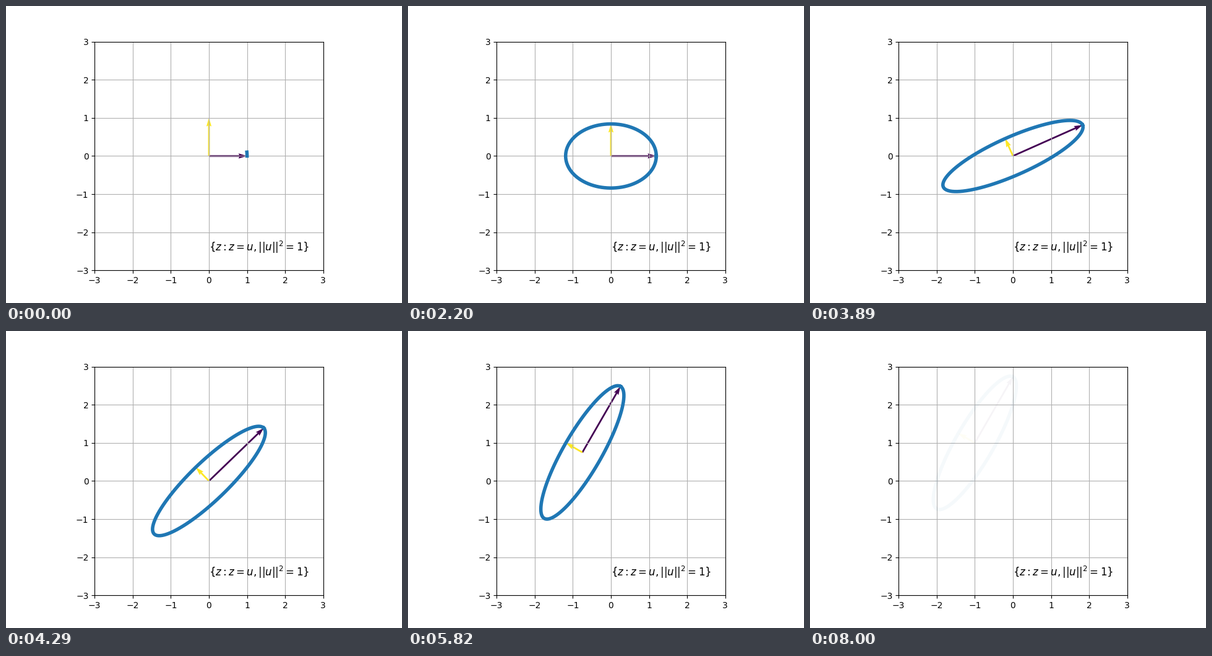
These frames come from a looping animation (640x480 px, 8.04 s). A matplotlib script:

```python
import numpy as np
import matplotlib.pyplot as plt
from matplotlib.animation import FuncAnimation

LOOP = 8040   # ms
TICK = 20     # ms between drawn frames
STEP = 40     # ms between poses

ARC = np.linspace(0.1, 2 * np.pi, 50)

fig, ax = plt.subplots(figsize=(6.4, 4.8), dpi=100)
ax.set(xlim=(-3, 3), ylim=(-3, 3), aspect="equal",
       xticks=range(-3, 4), yticks=range(-3, 4))
ax.grid(True)
ax.text(0, -2.5, r"$\{z: z=u, ||u||^2=1\}$", fontsize=12)

curve, = ax.plot([], [], color="C0", lw=4)
arrows = ax.quiver([0, 0], [0, 0], [1, 0], [0, 1], [0, 1],
                   angles="xy", scale_units="xy", scale=1)


def steps(t, start, count):
    """Number of poses passed since start, limited to count."""
    return int(np.clip((t - start) // STEP + 1, 0, count))


def update(k):
    t = k * TICK + TICK / 2
    intro = steps(t, STEP, 73)
    spin = steps(t, 3450, 30)
    shift = steps(t, 5140, 24)
    fade = steps(t, 7120, 23)

    # trace the unit circle, then stretch, rotate, translate and fade it
    u = np.linspace(0, ARC[min(intro, 49)], 100)
    a = 2 ** (max(intro - 49, 0) / 24)
    phi = np.radians(2 * spin)
    c, s = np.cos(phi), np.sin(phi)
    axes = np.array([[c, -s], [s, c]]) @ np.diag([a, 1 / a])
    center = np.array([-1, 1]) * shift / 24
    alpha = 1 - fade / 24

    x, y = axes @ np.array([np.cos(u), np.sin(u)]) + center[:, None]
    curve.set_data(x, y)
    curve.set_alpha(alpha)
    arrows.set_offsets([center, center])
    arrows.set_UVC(*axes)
    arrows.set_alpha(alpha)
    return curve, arrows


anim = FuncAnimation(fig, update, frames=LOOP // TICK, interval=TICK,
                     init_func=lambda: update(0), repeat=True,
                     repeat_delay=0, blit=False)
plt.show()
```
